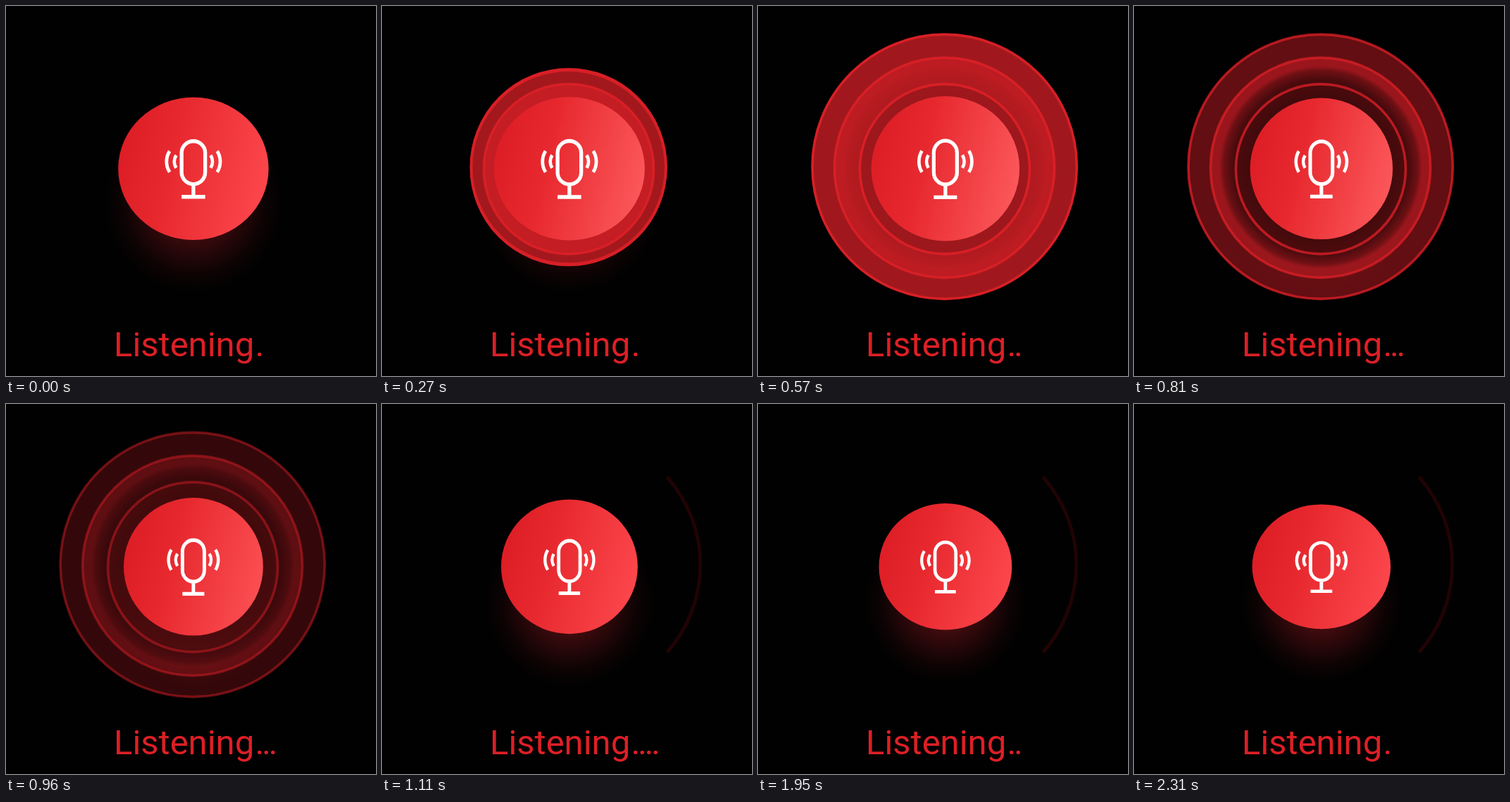
An HTML page with a canvas for the animation above (2.34 s loop, 525 by 525 pixels).

```html
<!DOCTYPE html>
<html lang="en">
<head>
<meta charset="utf-8">
<title>Listening</title>
<style>
html, body { margin: 0; width: 100%; height: 100%; overflow: hidden; background: #000; }
canvas { display: block; }
</style>
</head>
<body>
<canvas id="stage" width="525" height="525"></canvas>
<script>
const ctx = document.getElementById('stage').getContext('2d');
const LOOP = 2340, TAU = Math.PI * 2, RED = '#dd1f26';
const CX = 265.9, CY = 230.8;

// Button shape over time: [ms, horizontal radius, vertical radius]
const KEYS = [
  [0, 106.7, 101.2], [270, 106.9, 101.7], [570, 105.2, 102.7], [810, 101.2, 100.3],
  [1110, 96.9, 95.4], [1590, 91.9, 91.4], [2310, 98.2, 88.4], [2340, 98.5, 88.3]
];
const DOTS = [1, 2, 3, 4, 3, 2, 1];

const clamp = x => Math.min(1, Math.max(0, x));
const mix = (a, b, u) => a + (b - a) * u;

// Cubic Hermite through the keys
function keyed(t, col) {
  const slope = i => {
    const a = KEYS[Math.max(0, i - 1)], b = KEYS[Math.min(KEYS.length - 1, i + 1)];
    return (b[col] - a[col]) / (b[0] - a[0]);
  };
  let i = 0;
  while (i < KEYS.length - 2 && t >= KEYS[i + 1][0]) i++;
  const a = KEYS[i], b = KEYS[i + 1], h = b[0] - a[0], u = (t - a[0]) / h;
  const s = u * u * (3 - 2 * u);
  return mix(a[col], b[col], s) +
    h * u * (1 - u) * ((1 - u) * slope(i) - u * slope(i + 1));
}

function disc(x, y, r, fill) {
  ctx.beginPath();
  ctx.arc(x, y, r, 0, TAU);
  ctx.fillStyle = fill;
  ctx.fill();
}

function radial(x, y, r0, r1, rgb, stops) {
  const g = ctx.createRadialGradient(x, y, r0, x, y, r1);
  stops.forEach(([at, alpha]) => g.addColorStop(at, `rgba(${rgb},${alpha})`));
  return g;
}

function drawGlow(ry) {
  const y = CY + 50, r = ry + 25;
  disc(CX, y, r, radial(CX, y, 0, r, '205,34,44',
    [[0, 0.38], [0.35, 0.31], [0.6, 0.17], [0.8, 0.06], [1, 0]]));
}

function drawRings(t) {
  const fade = clamp((t - 570) / 540);
  if (fade >= 1) return;
  const settle = clamp((t - 270) / 300);
  const rings = [
    [264.7, 228, 187.6, 160],
    [264.6, 229.4, 156, mix(163, 188, settle)],
    [265, 231.4, 120.5, mix(196, 168, settle)]
  ].map(([x, y, max, red]) => [x, y, Math.min(max, 93 + t / 6), red]);

  ctx.globalAlpha = 1 - fade ** 1.2;
  for (const [x, y, r, red] of rings)
    disc(x, y, r, `rgb(${red},${red * 0.15},${red * 0.18})`);

  ctx.globalAlpha = clamp((t - 540) / 270) * (1 - fade ** 4);
  disc(265, 229, 144, radial(265, 229, 100, 144, '0,0,0',
    [[0, 0.62], [0.55, 0.55], [0.85, 0.3], [1, 0]]));

  ctx.globalAlpha = 1 - fade ** 2;
  ctx.strokeStyle = '#d81f26';
  ctx.lineWidth = 3.6;
  for (const [x, y, r] of rings) {
    ctx.beginPath();
    ctx.arc(x, y, r, 0, TAU);
    ctx.stroke();
  }
  ctx.globalAlpha = 1;
}

// Faint remainder of the outer ring on the right
function drawTrace() {
  ctx.beginPath();
  ctx.arc(264.7, 228, 187, -0.728, 0.728);
  ctx.strokeStyle = '#210304';
  ctx.lineWidth = 4.8;
  ctx.stroke();
}

function drawButton(rx, ry, t) {
  const lit = clamp(t / 270) * (1 - clamp((t - 810) / 300));
  const g = ctx.createLinearGradient(CX - rx, CY - 25, CX + rx, CY + 25);
  g.addColorStop(0, '#dd1d25');
  g.addColorStop(0.35, '#e7292f');
  g.addColorStop(1, `rgb(252,${mix(71, 88, lit)},${mix(76, 91, lit)})`);
  ctx.beginPath();
  ctx.ellipse(CX, CY, rx, ry, 0, 0, TAU);
  ctx.fillStyle = g;
  ctx.fill();
}

function drawMic(rx, ry) {
  ctx.save();
  ctx.translate(CX, CY + 0.3);
  ctx.scale(rx / 106.5, ry / 101);
  ctx.strokeStyle = '#fff';
  ctx.lineWidth = 5.3;
  ctx.beginPath();
  ctx.roundRect(-16.7, -39.3, 33.4, 61, 16.7);
  ctx.moveTo(0, 22);
  ctx.lineTo(0, 39);
  ctx.moveTo(-16.7, 39.6);
  ctx.lineTo(16.7, 39.6);
  ctx.stroke();
  ctx.lineWidth = 4.8;
  for (const side of [0, Math.PI]) {
    for (const r of [17, 28]) {
      ctx.beginPath();
      ctx.arc(10 * Math.cos(side), -10.3, r, side - 0.56, side + 0.56);
      ctx.stroke();
    }
  }
  ctx.restore();
}

function drawText(t) {
  ctx.fillStyle = RED;
  ctx.font = '49px Roboto, sans-serif';
  ctx.textAlign = 'left';
  ctx.fillText('Listening', 153, 496.8);
  ctx.textAlign = 'center';
  const count = DOTS[Math.floor(t / LOOP * DOTS.length)];
  for (let i = 0; i < count; i++) ctx.fillText('.', 360 + 9.5 * i, 496.8);
}

function draw(now) {
  const t = now % LOOP, rx = keyed(t, 1), ry = keyed(t, 2);
  ctx.fillStyle = '#010101';
  ctx.fillRect(0, 0, 525, 525);
  drawGlow(ry);
  drawRings(t);
  if (t >= 1080) drawTrace();
  drawButton(rx, ry, t);
  drawMic(rx, ry);
  drawText(t);
}

const start = performance.now();
function tick() {
  draw(performance.now() - start);
  requestAnimationFrame(tick);
}
tick();
</script>
</body>
</html>
```
